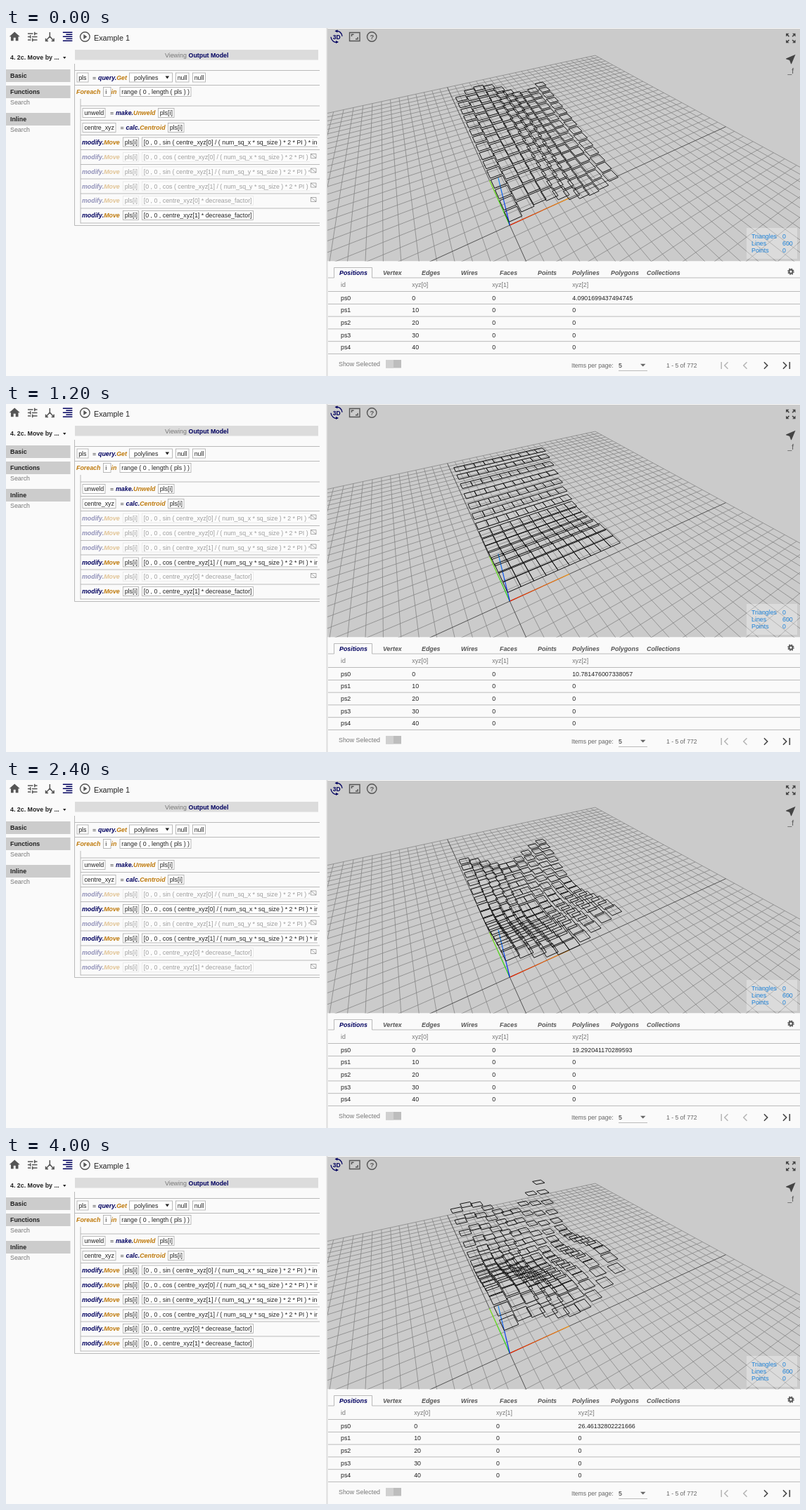
These frames come from a looping animation (1129x496 px, 4200 ms). An HTML page:

```html
<!DOCTYPE html>
<html lang="en">
<head>
<meta charset="utf-8">
<title>Move by formula</title>
<style>
  html, body { margin: 0; width: 100%; height: 100%; overflow: hidden; background: #fafafa; }
  svg { display: block; position: absolute; left: 0; top: 0; }
  text { font: 8.85px "Liberation Sans", Arial, sans-serif; fill: #222; white-space: pre; }
  .b { font-weight: bold; }
  .bi { font-weight: bold; font-style: italic; }
  .navy { fill: #00005f; }
  .gold { fill: #bf7a0c; }
  .grey { fill: #777; }
  .blue { fill: #1e82d8; }
  .box { fill: #fff; stroke: #aaa; stroke-width: .8; }
  .rule { fill: none; stroke: #aaa; stroke-width: .8; }
  .arg { clip-path: url(#wide); }
  .mark { display: none; fill: none; stroke: #555; stroke-width: .8; }
  .off .body { opacity: .42; }
  .off .box { stroke: #ccc; }
  .off .arg { clip-path: url(#narrow); }
  .off .mark { display: inline; opacity: .6; }
</style>
</head>
<body>
<svg id="stage" width="1129" height="496" viewBox="0 0 1129 496"></svg>
<script>
const STEP = 200;
// Which of the six moves A-F are switched on, step by step
const STATES = ('AF BE BF CE CF DE DF EF AB AC AD BC BD CD ' +
  'ABC ABD ACD BCD ABCD ABCDE ABCDEF').split(' ');
const NX = 10, NY = 15, SIZE = 10, HEIGHT = 10, SLOPE = 0.2;

const wave = (fn, c, n) => fn(c / (n * SIZE) * 2 * Math.PI) * HEIGHT;
const MOVES = {
  A: (x, y) => wave(Math.sin, x, NX),
  B: (x, y) => wave(Math.cos, x, NX),
  C: (x, y) => wave(Math.sin, y, NY),
  D: (x, y) => wave(Math.cos, y, NY),
  E: (x, y) => x * SLOPE,
  F: (x, y) => y * SLOPE
};
const lift = (state, x, y) => [...state].reduce((z, k) => z + MOVES[k](x, y), 0);

// Perspective camera
const RAD = Math.PI / 180, FOCAL = 357, PITCH = 39.6 * RAD, YAW = 29.5 * RAD;
const SP = Math.sin(PITCH), CP = Math.cos(PITCH), SY = Math.sin(YAW), CY = Math.cos(YAW);
function toCamera(x, y, z) {
  const ahead = x * SY + y * CY;
  return [-39.3 + x * CY - y * SY, -58.2 + ahead * SP + z * CP, 181.8 + ahead * CP - z * SP];
}
const toScreen = ([r, u, d]) => [793.5 + FOCAL * r / d, 166.8 - FOCAL * u / d];
const fmt = p => p.map(v => v.toFixed(2)).join(' ');
const point = (x, y, z) => fmt(toScreen(toCamera(x, y, z)));

// Ground line, cut off in front of the camera
function groundLine(a, b) {
  const near = 8;
  let p = toCamera(...a, 0), q = toCamera(...b, 0);
  if (p[2] > q[2]) [p, q] = [q, p];
  if (q[2] <= near) return '';
  if (p[2] < near) {
    const t = (near - p[2]) / (q[2] - p[2]);
    p = p.map((v, i) => v + (q[i] - v) * t);
  }
  return `M${fmt(toScreen(p))}L${fmt(toScreen(q))}`;
}
function grid() {
  const L = 250;
  let fine = '', main = '';
  for (let i = -L; i <= L; i += 10) {
    const pair = groundLine([i, -L], [i, L]) + groundLine([-L, i], [L, i]);
    if (i) fine += pair; else main = pair;
  }
  return `<path d="${fine}" fill="none" stroke="#868686" stroke-width=".8"/>
    <path d="${main}" fill="none" stroke="#444" stroke-width=".9"/>`;
}
function axis(id, end, from, to) {
  const [x1, y1] = toScreen(toCamera(0, 0, 0)), [x2, y2] = toScreen(toCamera(...end));
  const ends = `x1="${x1}" y1="${y1}" x2="${x2}" y2="${y2}"`;
  return `<linearGradient id="${id}" gradientUnits="userSpaceOnUse" ${ends}>
    <stop stop-color="${from}"/><stop offset="1" stop-color="${to}"/></linearGradient>
    <line ${ends} stroke="url(#${id})" stroke-width="1.2"/>`;
}
function mesh(state) {
  let d = '';
  for (let x = 0; x < NX * SIZE; x += SIZE)
    for (let y = 0; y < NY * SIZE; y += SIZE) {
      const z = lift(state, x + SIZE / 2, y + SIZE / 2);
      d += 'M' + [[0, 0], [SIZE, 0], [SIZE, SIZE], [0, SIZE]]
        .map(([i, j]) => point(x + i, y + j, z)).join('L') + 'Z';
    }
  return d;
}

// Drawing helpers
const text = (x, y, s, cls = '', extra = '') => `<text x="${x}" y="${y}" class="${cls}" ${extra}>${s}</text>`;
const rect = (x, y, w, h, fill) => `<rect x="${x}" y="${y}" width="${w}" height="${h}" fill="${fill}"/>`;
const rule = d => `<path class="rule" d="${d}"/>`;
const box = (x, mid, w, s, pad = 2.7) =>
  `<rect class="box" x="${x + .5}" y="${mid - 6.5}" width="${w}" height="13"/>` + text(x + pad, mid + 3, s);
const call = (x, mid, mod, fn) =>
  `<text x="${x}" y="${mid + 3}" class="bi"><tspan class="navy">${mod}.</tspan><tspan class="gold">${fn}</tspan></text>`;
const icon = (x, y, k, d, fill = '#555', extra = '') =>
  `<path transform="translate(${x} ${y}) scale(${k})" d="${d}" fill="${fill}" ${extra}/>`;
const line = (d, color, w = 1.4) => `<path d="${d}" fill="none" stroke="${color}" stroke-width="${w}"/>`;
const ring = (x, y, r, w = 1.4) =>
  `<circle cx="${x}" cy="${y}" r="${r}" fill="none" stroke="#555" stroke-width="${w}"/>`;

function toolbar() {
  return icon(3.2, 3.2, .75, 'M10 20v-6h4v6h5v-8h3L12 3 2 12h3v8z', '#555', 'id="home"') +
    icon(28.7, 3.4, .75, 'M3 17v2h6v-2H3zM3 5v2h10V5H3zm10 16v-2h8v-2h-8v-2h-2v6h2zM7 9v2H3v2h4v2h2V9H7zm14 4v-2H11v2h10zm-6-4h2V7h4V5h-4V3h-2v6z') +
    line('M62.3 6V12L57 18M62.3 12L67.6 18M56.5 14.8V18.4H60M68.1 14.8V18.4H64.6', '#555', 1.5) +
    icon(78.6, 3.2, .75, 'M3 21h18v-2H3v2zm6-4h12v-2H9v2zm-6-4h18v-2H3v2zm6-4h12V7H9v2zM3 3v2h18V3H3z', '#00005f') +
    ring(112.3, 12.5, 6.8) + icon(110.3, 9, 1, 'M0 0v7l5-3.5z') +
    text(125, 17.5, 'Example 1', '', 'style="font-size:10.8px"');
}
function sidebar() {
  const bars = [['Basic', 59], ['Functions', 82], ['Inline', 121]]
    .map(([s, y]) => rect(0, y, 91.5, 18, '#ccc') + text(6, y + 12.3, s, 'b')).join('');
  return text(6, 45, '4. 2c. Move by ...', 'b') + icon(81, 41, 1, 'M0 0h4.4l-2.2 3z', '#222') + bars +
    text(6, 109, 'Search', 'grey') + text(6, 147.5, 'Search', 'grey');
}
function moveRow(key, i) {
  const mid = [162.5, 184, 204.5, 225.5, 246, 267][i], ax = i % 2;
  const fn = ax ? 'cos' : 'sin', dim = i < 2 ? 0 : 1, n = 'xy'[dim];
  const arg = i < 4
    ? `[0 , 0 , ${fn} ( centre_xyz[${dim}] / ( num_sq_${n} * sq_size ) * 2 * PI ) * inc_factor]`
    : `[0 , 0 , centre_xyz[${ax}] * decrease_factor]`;
  return `<g id="row${key}"><g class="body">${call(108, mid, 'modify', 'Move')}${box(166, mid, 22, 'pls[i]')}
    <g class="arg">${box(193, mid, i < 4 ? 300 : 158, arg)}</g></g>
    <path class="mark" d="M433.5 ${mid - 4.5}h7.5v6h-7.5zl7.5 6"/></g>`;
}
function code() {
  const inner = [111, 131.5, 152.5, 173.5, 194.5, 215, 236, 257, 278]
    .map(y => `M106 ${y}H446`).join('');
  return rect(98, 31, 346, 14.5, '#dcdcdc') + text(226, 41.7, 'Viewing', 'grey') +
    text(259.5, 41.7, 'Output Model', 'b navy') +
    rule('M97.5 51V281.5H446M98 60.5H446M98 81.5H446M106 101V278.5' + inner) +
    box(100.5, 70.5, 16, 'pls') + text(123, 73.5, '=') + call(131, 70.5, 'query', 'Get') +
    box(175, 70.5, 61, 'polylines', 7) + icon(226.5, 68.5, 1, 'M0 0h5.6l-2.8 4z', '#222') +
    box(241, 70.5, 18.5, 'null') + box(265, 70.5, 18, 'null') +
    text(100, 94, 'Foreach', 'bi gold') + box(138, 91, 10.5, 'i', 3.2) + text(149.5, 94, 'in', 'bi gold') +
    box(161.5, 91, 101, 'range ( 0 , length ( pls ) )') +
    box(108.5, 121, 32, 'unweld') + text(148, 124, '=') + call(156, 121, 'make', 'Unweld') +
    box(216, 121, 22.5, 'pls[i]') +
    box(108.5, 142, 47, 'centre_xyz') + text(162.5, 145, '=') + call(170.5, 142, 'calc', 'Centroid') +
    box(230, 142, 22.5, 'pls[i]') + Object.keys(MOVES).map(moveRow).join('');
}
function viewer() {
  const stats = [['Triangles', 0], ['Lines', 600], ['Points', 0]].map(([s, n], i) =>
    text(1060, 299.7 + i * 10, s, 'blue') + text(1104, 299.7 + i * 10, n, 'blue')).join('');
  return rect(455.5, 0, 2, 496, '#dcdcdc') + '<g clip-path="url(#view)">' + rect(457, 1, 672, 331.5, '#cbcbcb') + grid() +
    axis('ax', [50, 0, 0], '#e02000', '#ef9a20') + axis('ay', [0, 50, 0], '#20e020', '#8cf020') +
    axis('az', [0, 0, 50], '#0010f0', '#1a90f0') +
    '<path id="mesh" fill="none" stroke="#111" stroke-width="1"/>' +
    rect(1053, 285, 72, 44, 'rgba(255,255,255,.3)') + stats + '</g>' +
    text(464.8, 15.5, '3D', 'b navy', 'style="font-size:8.5px"') +
    line('M468.5 4.3A8 8 0 0 1 478 11.8M471.5 20.2A8 8 0 0 1 462 12.8', '#00005f', 1.3) +
    icon(467.5, 2.5, 1, 'M0 2l4-2v4z', '#00005f') + icon(469, 18, 1, 'M4 2L0 0v4z', '#00005f') +
    line('M488.5 6.5h14.5v12h-14.5zM491.5 12V9.3h3M500 13v2.8h-3', '#555', 1.4) +
    ring(520.2, 12.5, 6.7) + text(517.5, 16.2, '?', 'b', 'style="font-size:9.5px;fill:#555"') +
    icon(1106.8, 5.6, .75, 'M15 3l2.3 2.3-2.89 2.87 1.42 1.42L18.7 6.7 21 9V3zM3 9l2.3-2.3 2.87 2.89 1.42-1.42L6.7 5.3 9 3H3zm6 12l-2.3-2.3 2.89-2.87-1.42-1.42L5.3 17.3 3 15v6zm12-6l-2.3 2.3-2.87-2.89-1.42 1.42 2.89 2.87L15 21h6z', '#444') +
    icon(1106.8, 35.5, .75, 'M21 3L3 10.53v.98l6.84 2.65L12.48 21h.98L21 3z', '#444') +
    text(1111.5, 65, '_f', '', 'style="font-size:10.5px;fill:#555"');
}
function table() {
  const tabs = [['Vertex', 536], ['Edges', 591], ['Wires', 647], ['Faces', 702], ['Points', 756],
    ['Polylines', 805], ['Polygons', 860], ['Collections', 911]]
    .map(([s, x]) => text(x, 352, s, 'bi', 'style="fill:#555"')).join('');
  const rows = [0, 1, 2, 3, 4].map(i => {
    const y = 387.8 + i * 17.6;
    return text(476, y, 'ps' + i) + text(0, y, i * 10, 'c1') + text(0, y, 0, 'c2') +
      text(0, y, 0, 'c3', i ? '' : 'id="value"') + rule(`M458 ${393.4 + i * 17.75}H1129`);
  }).join('');
  const head = text(476, 369.3, 'id', 'grey') +
    [0, 1, 2].map(i => text(0, 369.3, `xyz[${i}]`, `grey c${i + 1}`)).join('');
  const small = 'style="font-size:8.6px;fill:#666"';
  return rule('M458 356H466.5V341.5H520.5V356H1129M458 375.5H1129') + text(474, 352, 'Positions', 'bi navy') +
    tabs + ring(1116, 347.2, 2.6, 2) +
    '<circle cx="1116" cy="347.2" r="4.1" fill="none" stroke="#555" stroke-width="1.3" stroke-dasharray="1.7 1.52"/>' +
    head + rows + text(473, 481.7, 'Show Selected', 'grey') +
    rect(540, 473, 22, 11.5, '#bdbdbd') + rect(540, 473, 11, 11.5, '#d0d0d0') +
    text(804, 484, 'Items per page:', '', small) + text(871, 484, '5') + rule('M871 488.5H912') +
    icon(902, 478.8, 1, 'M0 0h7.4l-3.7 3.8z', '#666') + text(939, 484, '1 - 5 of 772', '', small) +
    line('M1017.2 476V486M1026.5 476.3L1021.8 481L1026.5 485.7M1053.5 476.3L1048.8 481L1053.5 485.7', '#b5b5b5', 1.5) +
    line('M1078 476.3L1082.7 481L1078 485.7M1105 476.3L1109.7 481L1105 485.7M1114.3 476V486', '#444', 1.6);
}

const stage = document.getElementById('stage');
stage.innerHTML = `<defs>
  <clipPath id="view">${rect(457, 1, 672, 331.5)}</clipPath>
  <clipPath id="wide">${rect(190, 150, 253, 140)}</clipPath>
  <clipPath id="narrow">${rect(190, 150, 242, 140)}</clipPath></defs>` +
  toolbar() + sidebar() + code() + viewer() + table();

const get = id => document.getElementById(id);
const columns = [1, 2, 3].map(i => stage.querySelectorAll('.c' + i));

// Columns share the table width in proportion to their content
function layout(value) {
  const digit = 4.92, last = Math.max(24, (value.length - .5) * digit) + 13.5;
  const k = 671 / (36.5 + 35 + 35 + last);
  columns.forEach((cells, i) =>
    cells.forEach(c => c.setAttribute('x', (458.4 + (36.5 + 35 * i) * k).toFixed(2))));
}
function show(state) {
  for (const key in MOVES) get('row' + key).classList.toggle('off', !state.includes(key));
  get('mesh').setAttribute('d', mesh(state));
  get('home').setAttribute('fill', state === 'AD' ? '#222' : '#555');
  const value = String(lift(state, SIZE / 2, SIZE / 2));
  get('value').textContent = value;
  layout(value);
}

let current = -1;
function tick() {
  const i = Math.floor(performance.now() / STEP) % STATES.length;
  if (i !== current) show(STATES[current = i]);
  requestAnimationFrame(tick);
}
tick();
</script>
</body>
</html>
```
